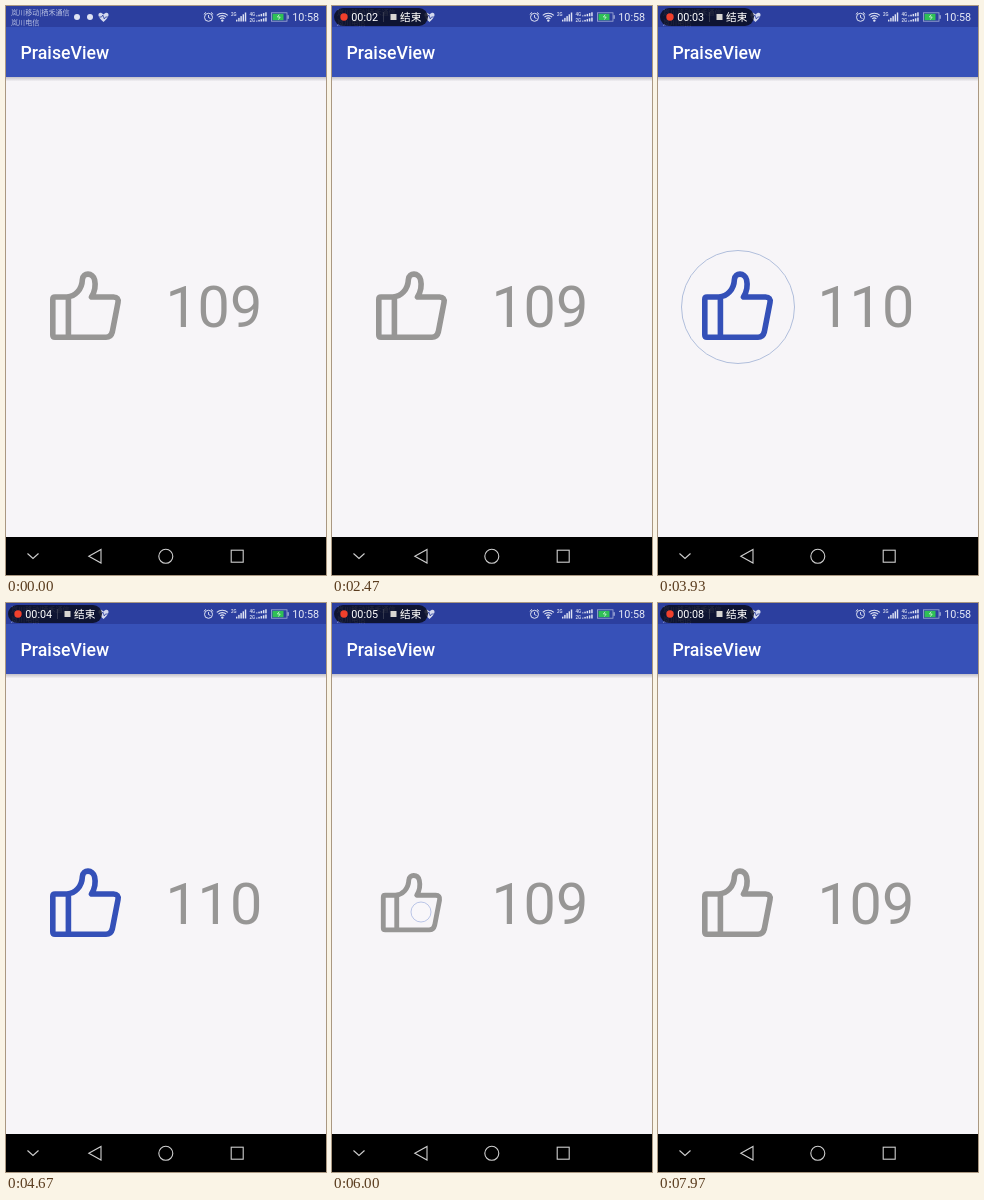
These frames come from a looping animation (320x569 px, 8000 ms). An HTML page with a canvas:

```html
<!DOCTYPE html>
<html lang="zh">
<head>
<meta charset="utf-8">
<title>PraiseView</title>
<style>
  html, body { margin: 0; width: 100%; height: 100%; overflow: hidden; background: #f7f5f8; }
  canvas { display: block; width: 320px; height: 569px; }
</style>
</head>
<body>
<canvas id="stage"></canvas>
<script>
const W = 320, H = 569, LOOP = 8000;
const GRAY = '#979695', BLUE = '#3450b8';
const LATIN = 'Roboto, sans-serif', CJK = '"Noto Sans CJK SC", "Noto Sans CJK", sans-serif';
const canvas = document.getElementById('stage');
const g = canvas.getContext('2d');
const dpr = window.devicePixelRatio || 1;
canvas.width = W * dpr;
canvas.height = H * dpr;

// Times in ms
const DOT_FLIPS = [970, 1470, 1970, 2470, 2970, 3500, 4000, 4500, 5100, 5500, 6070, 6500, 7000, 7500];
const SECONDS = [970, 1970, 2970, 4000, 5100, 6070, 7000, 7970];
const LIKE = 3412, UNLIKE = 4840, DIP = 390, ROLL = 350;
const TOUCHES = [
  { from: 3320, to: 3510, x: 82, y: 306 },
  { from: 4740, to: 4890, x: 84, y: 307 },
  { from: 5690, to: 7150, x: 89, y: 309 }
];

const part = (t, start, length) => Math.min(1, Math.max(0, (t - start) / length));
const ease = u => 0.5 - 0.5 * Math.cos(Math.PI * u);
const passed = (list, t) => list.filter(time => t >= time).length;

function text(str, x, y, font, color, alpha = 1) {
  g.save();
  g.globalAlpha *= alpha;
  g.font = font;
  g.fillStyle = color;
  g.fillText(str, x, y);
  g.restore();
}

function rect(x, y, w, h, color) {
  g.fillStyle = color;
  g.fillRect(x, y, w, h);
}

function disc(x, y, r, color) {
  g.beginPath();
  g.arc(x, y, r, 0, 2 * Math.PI);
  g.fillStyle = color;
  g.fill();
}

function line(points, color, width, closed) {
  g.beginPath();
  points.forEach(([x, y]) => g.lineTo(x, y));
  if (closed) g.closePath();
  g.strokeStyle = color;
  g.lineWidth = width;
  g.stroke();
}

function arc(x, y, r, color, width, from = 0, to = 2 * Math.PI) {
  g.beginPath();
  g.arc(x, y, r, from, to);
  g.strokeStyle = color;
  g.lineWidth = width;
  g.stroke();
}

function bars(x, bottom, count, step, height) {
  for (let i = 0; i < count; i++) {
    const h = height * (i + 1) / count;
    rect(x + i * step, bottom - h, step * 0.65, h, '#dfe3f3');
  }
}

function heart(x, y) {
  g.beginPath();
  g.moveTo(x, y + 5);
  g.bezierCurveTo(x - 9, y - 2, x - 4, y - 7, x, y - 2.5);
  g.bezierCurveTo(x + 4, y - 7, x + 9, y - 2, x, y + 5);
  g.fillStyle = '#d4d9ee';
  g.fill();
  line([[x - 5, y], [x - 2, y], [x - 0.7, y - 2], [x + 0.8, y + 2], [x + 2, y], [x + 5, y]], '#2c3f9f', 0.8);
}

function statusBar() {
  const soft = '#b9c1e3', light = '#dfe3f3';
  rect(0, 0, W, 21, '#2c3f9f');
  text('岚川移动|栖禾通信', 5, 9, '7.1px ' + CJK, soft);
  text('岚川电信', 5, 19, '7.1px ' + CJK, soft);
  disc(71, 11, 3, light);
  disc(84, 11, 3, light);
  heart(97.5, 11);

  arc(202.5, 11.3, 4, light, 1);
  line([[202.5, 9], [202.5, 11.5], [204.5, 12.5]], light, 0.9);
  line([[197.8, 8.4], [200, 6.4]], light, 1);
  line([[205, 6.4], [207.2, 8.4]], light, 1);

  for (const r of [3, 5.4, 7.8]) arc(216.3, 15, r, light, 1.1, -Math.PI * 0.75, -Math.PI * 0.25);
  disc(216.3, 14.6, 1.2, light);

  text('2G', 225, 9.5, '500 4.5px ' + LATIN, light);
  bars(230, 15.5, 5, 2.2, 9);
  text('4G', 243.5, 10, '500 4.5px ' + LATIN, light);
  text('2G', 243.5, 15.5, '500 4.5px ' + LATIN, light);
  bars(250, 10.3, 5, 2.3, 4);
  bars(250, 15.5, 5, 2.3, 4);

  g.strokeStyle = '#a3add8';
  g.lineWidth = 0.8;
  g.strokeRect(265.5, 6.8, 15.5, 8.4);
  rect(281.4, 9.2, 1.4, 3.6, '#a3add8');
  rect(266.5, 7.8, 11, 6.4, '#2fc056');
  line([[273.2, 8.6], [271.4, 11], [274.2, 11], [272.4, 13.6]], '#e8f8ec', 0.7);
  text('10:58', 286.3, 15, '10.8px ' + LATIN, '#e6e9f6');
}

function recorder(t) {
  g.save();
  g.globalAlpha = ease(part(t, 20, 390));
  g.beginPath();
  g.roundRect(2, 2, 94, 18, 9);
  g.fillStyle = 'rgba(9, 13, 30, 0.84)';
  g.fill();
  if (passed(DOT_FLIPS, t) % 2 === 0) disc(12, 11, 3.7, '#f0402c');
  text('00:0' + passed(SECONDS, t), 19.3, 15, '10.8px ' + LATIN, '#fff');
  rect(51, 6, 0.7, 10, '#454a5c');
  rect(58.5, 8, 6, 6, '#d8d6d2');
  text('结束', 68, 15, '10.7px ' + CJK, '#fff');
  g.restore();
}

function appBar() {
  const shade = g.createLinearGradient(0, 71, 0, 75.5);
  shade.addColorStop(0, 'rgba(40, 40, 60, 0.25)');
  shade.addColorStop(1, 'rgba(40, 40, 60, 0)');
  rect(0, 71, W, 5, shade);
  rect(0, 21, W, 50, '#3751b8');
  text('PraiseView', 14.5, 52.8, '500 17.7px ' + LATIN, '#fff');
}

function navBar() {
  const c = '#cfcfcf';
  rect(0, 531, W, 38, '#000');
  line([[21.5, 547.5], [27, 552.5], [32.5, 547.5]], c, 1.1);
  line([[82.8, 550.3], [95, 543.5], [95, 557]], c, 1.1, true);
  arc(159.8, 550.3, 7, c, 1.1);
  g.strokeRect(225.2, 544.2, 12, 12);
}

function thumb(scale, color) {
  const cx = 79.5, cy = 300;
  g.save();
  g.translate(cx, cy);
  g.scale(scale, scale);
  g.translate(-cx, -cy);
  g.lineJoin = g.lineCap = 'round';
  g.strokeStyle = color;
  g.lineWidth = 5.6;
  g.beginPath();
  g.moveTo(49, 291);
  g.lineTo(61, 291);
  g.bezierCurveTo(69, 290.3, 76, 284, 76.4, 273.3);
  g.bezierCurveTo(76.8, 266.3, 87, 266.3, 88.6, 273.8);
  g.bezierCurveTo(90, 280, 88.5, 286, 85.5, 291);
  g.lineTo(107.5, 291);
  g.quadraticCurveTo(113, 291.2, 112, 296.5);
  g.lineTo(106.3, 326);
  g.quadraticCurveTo(105, 331.2, 100, 331.2);
  g.lineTo(49, 331.2);
  g.quadraticCurveTo(46.8, 331.2, 46.8, 329);
  g.lineTo(46.8, 293.2);
  g.quadraticCurveTo(46.8, 291, 49, 291);
  g.closePath();
  g.moveTo(62.4, 291);
  g.lineTo(62.4, 331);
  g.stroke();
  g.restore();
}

function thumbScale(t) {
  const dip = start => 0.18 * Math.sin(Math.PI * part(t, start, DIP));
  const hold = ease(part(t, 5700, 400)) - ease(part(t, 7150, 350));
  return 1 - dip(LIKE) - dip(UNLIKE) - 0.16 * hold;
}

function ripple(t) {
  if (t < LIKE || t > 3985) return;
  arc(80, 301, 41.5 + 15 * part(t, LIKE, 515), '#a9b8d8', 0.9);
}

function counter(t) {
  const font = '57.5px ' + LATIN, x = 159.4, y = 320.6, pitch = 32.2, drop = 68;
  const p = ease(part(t, LIKE, ROLL)) - ease(part(t, UNLIKE, ROLL));
  text('1', x, y, font, GRAY);
  if (p < 1) text('09', x + pitch, y - drop * p, font, GRAY, 1 - p);
  if (p > 0) text('10', x + pitch, y + drop * (1 - p), font, GRAY, p);
}

function touch(t) {
  const hit = TOUCHES.find(h => t >= h.from && t < h.to);
  if (!hit) return;
  disc(hit.x, hit.y, 10, 'rgba(255, 255, 255, 0.25)');
  arc(hit.x, hit.y, 10, 'rgba(175, 188, 228, 0.85)', 1);
}

function draw(t) {
  g.setTransform(dpr, 0, 0, dpr, 0, 0);
  rect(0, 0, W, H, '#f7f5f8');
  appBar();
  statusBar();
  recorder(t);
  ripple(t);
  thumb(thumbScale(t), t >= LIKE && t < UNLIKE ? BLUE : GRAY);
  counter(t);
  touch(t);
  navBar();
}

const begin = performance.now();
function tick() {
  draw((performance.now() - begin) % LOOP);
  requestAnimationFrame(tick);
}
tick();
</script>
</body>
</html>
```
